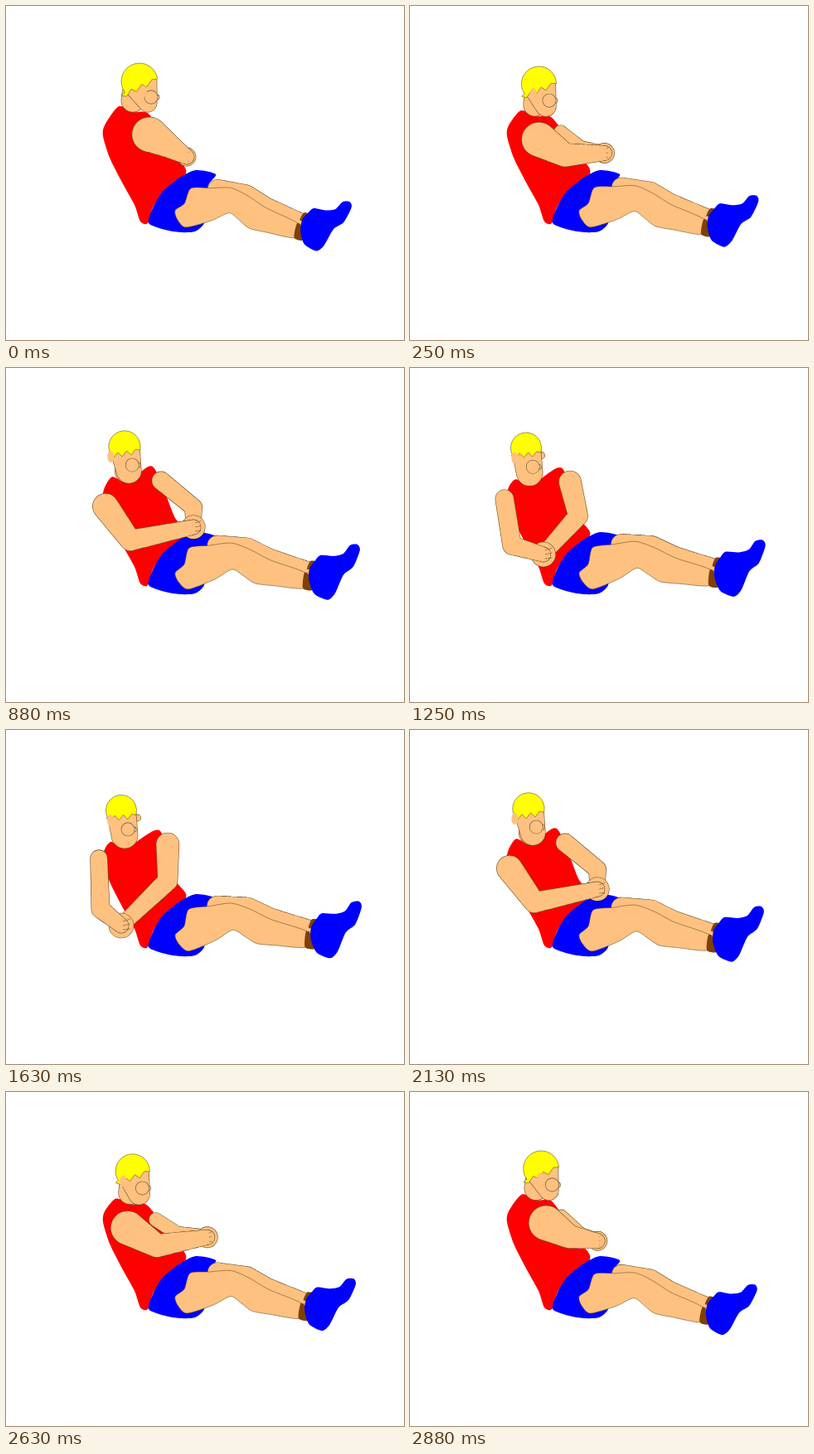
Animation of 480 by 403 pixels, one loop 3.01 s. Source, as an HTML page with a canvas:

```html
<!DOCTYPE html>
<html lang="en">
<head>
<meta charset="utf-8">
<title>Seated twist</title>
<style>
html, body { margin: 0; overflow: hidden; background: #fff; }
canvas { display: block; }
</style>
</head>
<body>
<canvas id="stage" width="480" height="403"></canvas>
<script>
const ctx = document.getElementById('stage').getContext('2d');
const SKIN = '#ffc17f', RED = '#f00', BLUE = '#00f', YELLOW = '#ff0', BROWN = '#804000', LINE = '#6b5030';
const HIP = [206, 245];

// Joint positions at four steps of the twist, from profile to facing the viewer.
const STEPS = [0, 4, 7, 11];
const JOINTS = {
  skull: [[161, 91], [150, 97], [143, 95], [139, 97]],
  nearShoulder: [[173, 155], [138, 167], [120, 167], [112, 155]],
  nearElbow: [[197, 169], [177, 191], [150, 208], [114, 216]],
  farShoulder: [[183, 148], [180, 156], [187, 136], [195, 138]],
  farElbow: [[204, 171], [208, 171], [226, 168], [195, 182]],
  hand: [[218, 182], [251, 173], [226, 192], [139, 236]]
};

const points = text => text.split(' ').map(p => p.split(',').map(Number));
const SHORTS = points('229,198 253,203 244,216 240,240 239,262 228,272 210,273 192,270 172,262 177,244 188,225 208,208');
const NEAR_LEG = points('221,217 245,214 272,211 295,219 320,232 363,248 360,266 325,263 301,260 287,251 273,243 252,255 220,267 208,258 204,247 215,237');
const SHOES = points('374,232 380,226 396,227 408,224 416,214 425,213 428,220 420,240 408,250 398,272 389,280 374,274 369,266 366,255 367,242');
const NEAR_SOCK = points('361,247 370,254 371,268 359,266');
const FAR_SOCK = points('368,233 376,234 373,242 364,243');

const lerp = (a, b, k) => a + (b - a) * k;
const mix = (a, b, k) => a.map((v, i) => lerp(v, b[i], k));
const add = ([x, y], dx, dy) => [x + dx, y + dy];

function joint(keys, step) {
  let i = 0;
  while (i < STEPS.length - 2 && step >= STEPS[i + 1]) i++;
  return mix(keys[i], keys[i + 1], (step - STEPS[i]) / (STEPS[i + 1] - STEPS[i]));
}

function fill(color, outlined) {
  ctx.fillStyle = color;
  ctx.fill();
  if (outlined) ctx.stroke();
}

function blob(pts, color, outlined) {
  const n = pts.length, at = i => pts[(i + n) % n];
  ctx.beginPath();
  ctx.moveTo(...pts[0]);
  for (let i = 0; i < n; i++) {
    const [p, q, r, s] = [at(i - 1), at(i), at(i + 1), at(i + 2)];
    ctx.bezierCurveTo(q[0] + (r[0] - p[0]) / 8, q[1] + (r[1] - p[1]) / 8,
      r[0] - (s[0] - q[0]) / 8, r[1] - (s[1] - q[1]) / 8, ...r);
  }
  ctx.closePath();
  fill(color, outlined);
}

// A tapering tube through [x, y, radius] joints, with a thin rim.
function limb(...joints) {
  for (const [color, rim] of [[LINE, 0.4], [SKIN, -0.2]]) {
    ctx.fillStyle = color;
    ctx.beginPath();
    for (let i = 0; i < joints.length; i++) {
      for (let k = 0; k < 1; k += 0.02) {
        const [x, y, r] = mix(joints[i], joints[i + 1] || joints[i], k);
        ctx.moveTo(x + r, y);
        ctx.arc(x, y, r + rim, 0, 7);
      }
    }
    ctx.fill();
  }
}

function drawLegs(turn) {
  ctx.save();
  ctx.translate(...HIP);
  ctx.rotate((5.9 - 7.5 * turn) * Math.PI / 180);
  ctx.scale(0.943 + 0.065 * turn, 0.943 + 0.065 * turn);
  ctx.translate(-HIP[0], -HIP[1]);
  limb([255, 214, 12], [292, 217, 12], [318, 230, 12], [366, 241, 7]);
  blob(FAR_SOCK, BROWN);
  blob(NEAR_LEG, SKIN, true);
  blob(NEAR_SOCK, BROWN);
  blob(SHOES, BLUE);
  ctx.restore();
}

function drawShorts(turn) {
  blob(SHORTS, BLUE);
  // Repaint the near thigh over the shorts.
  ctx.save();
  ctx.beginPath();
  ctx.rect(0, 0, 480, 403);
  ctx.restore();
}

function drawShirt(neck, shoulder) {
  blob([add(neck, -17, 7), add(neck, 2, 14), add(shoulder, -10, -17),
    ...points('203,179 217,202 180,238 171,262 162,260 155,240 139,211 125,183 117,157 119,144')], RED);
}

function drawHead(skull, neck, turn) {
  const r = 22 - 3.5 * turn;
  const chin = add(skull, 10 - 6 * turn, 26 + 4 * turn);
  limb([...add(skull, 20 * turn * turn, 9), 4]);
  limb([...add(neck, 0, -8), 13], [...neck, 14]);
  limb([...skull, r - 1], [...chin, 11 + 5 * turn]);
  limb([...add(chin, 11, -7), 3]);
  limb([...add(chin, 4, -7), 8]);

  const front = add(skull, 21 - 3 * turn, -3 + 9 * turn);
  const back = add(skull, -22 + 4 * turn, 17 - 8 * turn);
  const angle = p => Math.atan2(p[1] - skull[1], p[0] - skull[0]);
  ctx.beginPath();
  ctx.arc(...skull, r, angle(back), angle(front));
  for (let i = 1; i <= 7; i++) {
    const [x, y] = mix(front, back, i / 7);
    ctx.lineTo(x, y + (i % 2 ? -2 : 4) * (i < 7));
  }
  ctx.closePath();
  fill(YELLOW, true);

  ctx.beginPath();
  ctx.ellipse(...add(skull, 5 - 22 * Math.sin(2.2 * turn), 12), 4, 7, 0, 0, 7);
  fill(SKIN);
}

function drawHand([x, y], turn) {
  limb([x, y, 11 + 4 * turn]);
}

function drawFingers([x, y], turn) {
  for (let i = -1; i <= 1; i++) {
    ctx.beginPath();
    ctx.moveTo(x + 2, y + 5 * i);
    ctx.lineTo(x + 2 + 9 * turn, y + 6 * i - 2 * turn);
    ctx.stroke();
  }
}

function draw(step) {
  const turn = Math.sin(Math.PI / 2 * step / 12);
  const j = {};
  for (const name in JOINTS) j[name] = joint(JOINTS[name], Math.min(step, 11.3));
  const neck = add(j.skull, -8 + 13 * turn, 23 + 8 * turn);
  const wrist = [...j.hand, 9];

  ctx.fillStyle = '#fff';
  ctx.fillRect(0, 0, 480, 403);
  ctx.strokeStyle = LINE;
  ctx.lineWidth = 0.6;
  drawShirt(neck, j.farShoulder);
  blob(SHORTS, BLUE);
  drawLegs(turn);
  limb([...j.farShoulder, 8 + 6 * turn ** 3], [...j.farElbow, 8 + 4 * turn ** 2], wrist);
  drawHead(j.skull, neck, turn);
  drawHand(j.hand, turn);
  limb([...j.nearShoulder, 21 - 11 * turn ** 3], [...j.nearElbow, 14 - 3 * turn ** 3], wrist);
  drawFingers(j.hand, turn);
}

// 24 held poses: twelve steps out, twelve back, alternating 130 and 120 ms.
function tick(now) {
  const t = now % 3010;
  const index = Math.min(23, Math.floor(t / 250) * 2 + (t % 250 >= 130 ? 1 : 0));
  draw(12 - Math.abs(12 - index));
  requestAnimationFrame(tick);
}
tick(0);
</script>
</body>
</html>
```
